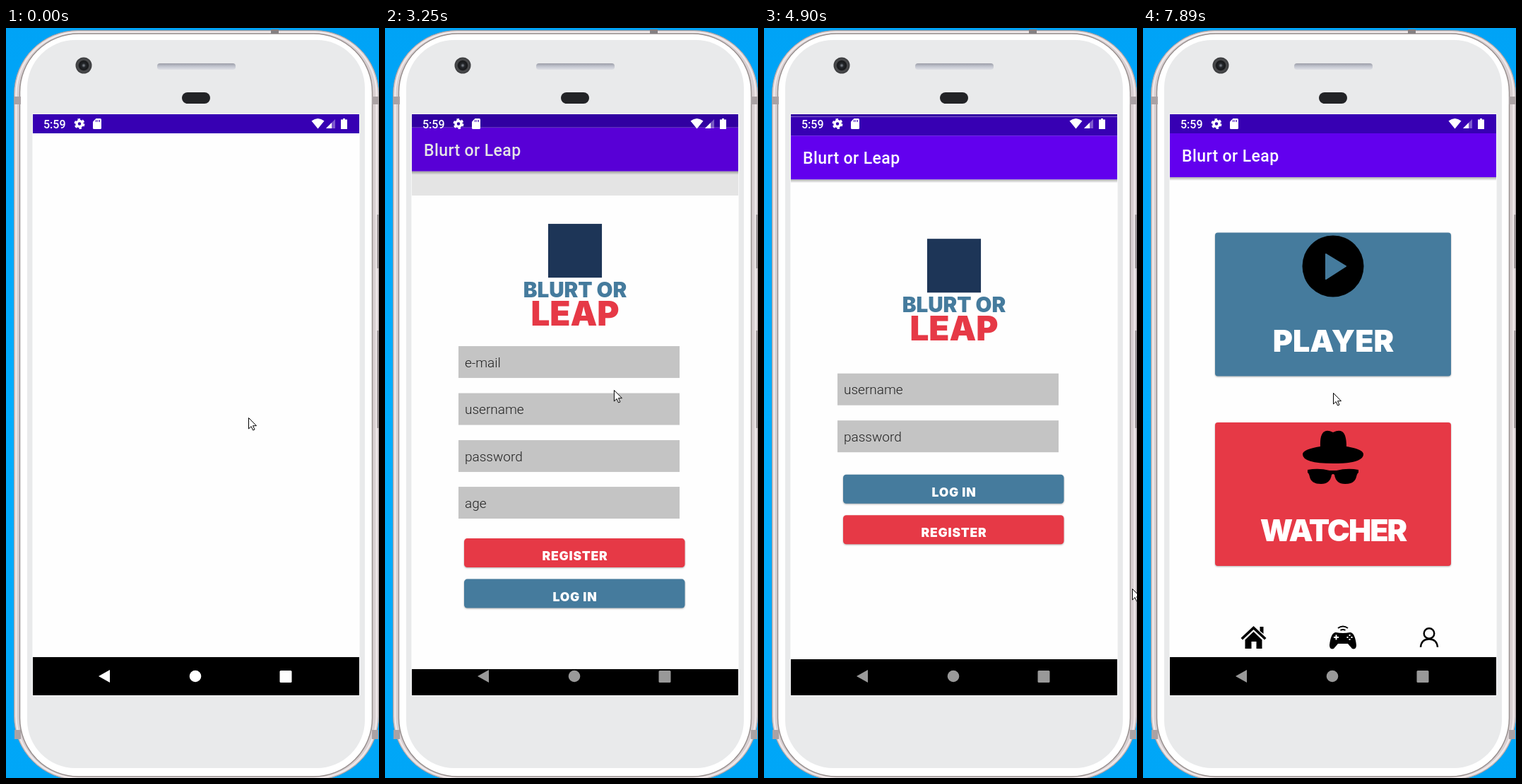
Recreate the animation shown at these times as an HTML page. Size 528x1061 px, loop 8 s.

```html
<!DOCTYPE html>
<html lang="en">
<head>
<meta charset="utf-8">
<title>Phone app walkthrough</title>
<style>
html, body { margin: 0; width: 100%; height: 100%; overflow: hidden; background: #00a9fb; }
svg { position: absolute; left: 0; top: 0; display: block; }
#stage { position: absolute; left: 0; top: 0; width: 528px; height: 1061px; overflow: hidden; }
#screen { position: absolute; left: 38px; top: 122px; width: 462px; height: 822px; overflow: hidden; background: #000; }

/* The script steps the clock of these paused animations. */
.win, .win::after, #nav, #status, #press, #cursor { animation-play-state: paused !important; }
.win {
  position: absolute; left: 0; top: 0; width: 462px; height: 768px; overflow: hidden; background: #fefefe;
  animation: enter .6s linear var(--in) both, leave .4s linear var(--out) both;
}
.win::after {
  content: ""; position: absolute; inset: 0; background: #000; opacity: 0;
  animation: dim .4s linear var(--out) both;
}
@keyframes enter {
  0%, 6% { transform: translateY(34px); clip-path: inset(768px 0 0 0); }
  20% { transform: translateY(24px); clip-path: inset(148px 0 0 0); }
  45% { transform: translateY(3.2px); clip-path: inset(0 0 0 0); }
  68% { transform: translateY(1.4px); clip-path: inset(0 0 0 0); }
  84%, 100% { transform: none; clip-path: inset(0 0 0 0); }
}
@keyframes leave {
  0% { translate: 0 0; }
  30% { translate: 0 -5px; }
  67% { translate: 0 -15px; }
  100% { translate: 0 -16px; }
}
@keyframes dim { 0% { opacity: 0; } 30%, 100% { opacity: .1; } }

#nav { animation: nav 8s linear both; }
@keyframes nav { 0%, 1% { fill: #fff; } 5%, 100% { fill: #999; } }
#status { animation: status 8s step-end both; }
@keyframes status { 0% { opacity: 1; } 8.25% { opacity: 0; } 27.3% { opacity: 1; } }
#press { animation: press 8s step-end both; }
@keyframes press { 0% { opacity: 0; } 57.7% { opacity: .22; } 59.7% { opacity: 0; } }

#cursor { width: 14px; height: 20px; overflow: visible; animation: cursor 8s linear both; }
@keyframes cursor {
  0% { transform: translate(343px, 551px); }
  1.62% { transform: translate(321px, 529px); }
  3.12% { transform: translate(301px, 503px); }
  5%, 30.38% { transform: translate(300px, 501px); }
  32.12% { transform: translate(293px, 609px); }
  33.87% { transform: translate(285px, 520px); }
  35.37% { transform: translate(280px, 450px); }
  37.25%, 39.12% { transform: translate(278px, 444px); }
  43.62% { transform: translate(415px, 647px); }
  48.12% { transform: translate(344px, 722px); }
  49.62%, 57.75% { transform: translate(333px, 711px); }
  59.75% { transform: translate(440px, 758px); }
  61.25% { transform: translate(521px, 793px); }
  63.12% { transform: translate(500px, 778px); }
  69.25%, 70.75% { transform: translate(300px, 650px); }
  72.25% { transform: translate(420px, 722px); }
  73.75%, 75.62% { transform: translate(495px, 768px); }
  81.87% { transform: translate(283px, 675px); }
  83.75% { transform: translate(290px, 796px); }
  85.75% { transform: translate(191px, 854px); }
  87.5% { transform: translate(230px, 857px); }
  89%, 92.12% { transform: translate(260px, 858px); }
  98.62%, 100% { transform: translate(269px, 516px); }
}

.blue { fill: #457b9d; }
.red { fill: #e63946; }
.navy { fill: #1d3557; }
.field { fill: #c4c4c4; }
.card { filter: drop-shadow(0 1.5px 1px rgba(0, 0, 0, .3)); }
.title { font: 500 23px Roboto, sans-serif; letter-spacing: .4px; fill: #fff; }
.clock { font: 500 16px Roboto, sans-serif; fill: #fff; }
.hint { font: 300 19px Roboto, sans-serif; fill: #222; }
.block { font-family: Inter, sans-serif; font-weight: 900; text-anchor: middle; }
.huge { font-size: 55px; letter-spacing: 5px; fill: #fff; }
.large { font-size: 43px; fill: #fff; }
.small { font-size: 17.5px; letter-spacing: .8px; fill: #fff; }
</style>
</head>
<body>
<div id="stage">

<!-- phone body -->
<svg width="528" height="1061" viewBox="0 0 528 1061">
  <defs>
    <linearGradient id="sky" x2="0" y2="1">
      <stop stop-color="#00a3f6"/><stop offset=".5" stop-color="#00adff"/><stop offset="1" stop-color="#00a6f7"/>
    </linearGradient>
    <linearGradient id="slot" x2="0" y2="1">
      <stop stop-color="#9c9ea8"/><stop offset=".5" stop-color="#c3c6d0"/><stop offset="1" stop-color="#dfe1e6"/>
    </linearGradient>
    <linearGradient id="shade" x2="0" y2="1">
      <stop stop-opacity=".32"/><stop offset="1" stop-opacity="0"/>
    </linearGradient>
    <radialGradient id="lens">
      <stop stop-color="#8b9099"/><stop offset=".25" stop-color="#24272b"/><stop offset=".55" stop-color="#17181a"/>
      <stop offset=".7" stop-color="#4c4d4f"/><stop offset="1" stop-color="#3a3b3d"/>
    </radialGradient>

    <g id="bar">
      <rect x="38" y="211" width="462" height="5" fill="url(#shade)"/>
      <rect x="38" y="149" width="462" height="62" fill="#6200ee"/>
      <text class="title" x="55" y="189">Blurt or Leap</text>
    </g>
    <g id="top">
      <use href="#bar"/>
      <rect x="38" y="122" width="462" height="27" fill="#3700b3"/>
    </g>
    <g id="logo">
      <rect class="navy" x="-65.5" width="131" height="131"/>
      <text class="block blue" y="179" font-size="51">BLURT OR</text>
      <text class="block red" y="248" font-size="82">LEAP</text>
    </g>
    <rect id="panel" x="102" width="334" height="203" rx="4"/>
    <rect id="button" x="112" width="312.5" height="41" rx="4.5"/>
    <rect id="input" x="104" width="313" height="45"/>

    <g id="house">
      <path d="M9-15h5v10l-5-4zM-18 1 0-16 18 1l-2.5 2.5L0-11-15.500 3.500z"/>
      <path d="M-12 3.500 0-8 12 3.500V16H4V6h-7v10h-9z"/>
    </g>
    <g id="pad">
      <path d="M-10-7Q0-5 10-7q7 0 9 18 0 7-6 5L7 9H-7l-6 7q-6 2-6-5 2-18 9-18z"/>
      <path d="M-7-13q7-5 14 0M-3.500-10q3.500-2 7 0" fill="none" stroke="#000" stroke-width="2"/>
      <path d="M-13 0h7M-9.500-3.500v7" stroke="#fff" stroke-width="2"/>
      <path d="M9.500-4v2m0 4v2M5.500 0h2m4 0h2" stroke="#fff" stroke-width="2"/>
    </g>
    <g id="person" fill="none" stroke="#000" stroke-width="2.4">
      <circle cy="-5.500" r="7.300"/>
      <path d="M-12 14Q-11 2.500 0 2.500T12 14"/>
    </g>
  </defs>

  <rect width="528" height="1061" fill="url(#sky)"/>
  <rect x="11.500" y="3.500" width="516" height="1060" rx="90" fill="#d9d0d2" stroke="#a79fa1"/>
  <rect x="14.500" y="6" width="510" height="1055" rx="87" fill="none" stroke="#f1ebec" stroke-width="2"/>
  <rect x="19.500" y="8" width="499" height="1051" rx="83" fill="#fff" stroke="#98908f" stroke-width="1.500"/>
  <rect x="22" y="10" width="494" height="1045" rx="80" fill="#fff"/>
  <rect x="30" y="17" width="478" height="1030" rx="68" fill="#e9eaeb"/>
  <path d="M12 97h9v11h-9zm506 0h9v11h-9zM12 993h9v13h-9zm506 0h9v13h-9z" fill="#aaa2a4"/>
  <path d="M375 2h11v6h-11z" fill="#858082"/>
  <path d="M526.500 264v76m0 88v138" stroke="#8c8587" stroke-width="2"/>
  <circle cx="110" cy="53" r="11.500" fill="url(#lens)"/>
  <rect x="214" y="50" width="111" height="9" rx="4" fill="url(#slot)"/>
  <rect x="249" y="91" width="40" height="16" rx="8" fill="#222326"/>
  <rect x="37" y="121" width="464" height="824" fill="#f6f6f7"/>
</svg>

<div id="screen">
  <svg width="462" height="822" viewBox="38 122 462 822">
    <g id="nav">
      <path d="M131 917l16-9v18z"/>
      <circle cx="268" cy="917" r="8.300"/>
      <rect x="387.500" y="909" width="17" height="17" rx="1.500"/>
    </g>
  </svg>

  <!-- launch -->
  <div class="win" style="--in:-1s;--out:.5s">
    <svg width="462" height="768" viewBox="38 122 462 768">
      <rect x="38" y="122" width="462" height="27" fill="#3700b3"/>
    </svg>
  </div>

  <!-- splash -->
  <div class="win" style="--in:.5s;--out:1.93s">
    <svg width="462" height="768" viewBox="38 122 462 768">
      <use href="#bar" y="-27"/>
      <use href="#logo" x="268.500" y="420"/>
    </svg>
  </div>

  <!-- welcome -->
  <div class="win" style="--in:1.93s;--out:3.08s">
    <svg width="462" height="768" viewBox="38 122 462 768">
      <use href="#top"/>
      <use class="card blue" href="#panel" y="313"/>
      <use class="card red" href="#panel" y="559.500"/>
      <text class="block huge" x="273" y="434">SIGN UP</text>
      <text class="block huge" x="272" y="681">LOG IN</text>
    </svg>
  </div>

  <!-- register -->
  <div class="win" style="--in:3.08s;--out:4.63s">
    <svg width="462" height="768" viewBox="38 122 462 768">
      <use href="#top"/>
      <use href="#logo" transform="translate(269 260) scale(.581)"/>
      <use class="field" href="#input" y="433"/>
      <use class="field" href="#input" y="499.500"/>
      <use class="field" href="#input" y="566"/>
      <use class="field" href="#input" y="632"/>
      <text class="hint" x="113" y="462.500">e-mail</text>
      <text class="hint" x="113" y="529">username</text>
      <text class="hint" x="113" y="595.500">password</text>
      <text class="hint" x="113" y="661.500">age</text>
      <use class="card red" href="#button" y="705"/>
      <use class="card blue" href="#button" y="762.500"/>
      <use id="press" href="#button" y="705" fill="#fff"/>
      <text class="block small" x="269" y="736">REGISTER</text>
      <text class="block small" x="269" y="793.500">LOG IN</text>
    </svg>
  </div>

  <!-- log in -->
  <div class="win" style="--in:4.63s;--out:5.78s">
    <svg width="462" height="768" viewBox="38 122 462 768">
      <use href="#top"/>
      <use href="#logo" transform="translate(269 295) scale(.581)"/>
      <use class="field" href="#input" y="485.500"/>
      <use class="field" href="#input" y="552"/>
      <text class="hint" x="113" y="515">username</text>
      <text class="hint" x="113" y="581.500">password</text>
      <use class="card blue" href="#button" y="628.500"/>
      <use class="card red" href="#button" y="686"/>
      <text class="block small" x="269" y="659.500">LOG IN</text>
      <text class="block small" x="269" y="717">REGISTER</text>
    </svg>
  </div>

  <!-- home -->
  <div class="win" style="--in:5.78s;--out:7.37s">
    <svg width="462" height="768" viewBox="38 122 462 768">
      <use href="#top"/>
      <use href="#house" x="142" y="862"/>
      <use href="#pad" x="268" y="862"/>
      <use href="#person" x="385.500" y="863"/>
    </svg>
  </div>

  <!-- role -->
  <div class="win" style="--in:7.37s;--out:9s">
    <svg width="462" height="768" viewBox="38 122 462 768">
      <use href="#top"/>
      <use class="card blue" href="#panel" y="289.500"/>
      <circle cx="269" cy="337" r="43.500"/>
      <path class="blue" d="M259 320l28 17-28 18z" stroke="#457b9d" stroke-width="2" stroke-linejoin="round"/>
      <text class="block large" x="269.500" y="458">PLAYER</text>
      <use class="card red" href="#panel" y="558"/>
      <path d="M251 592q-1-20 8-22 4-1 10 2 8-4 13-1 6 4 6 21 24 4 24 11 0 13-43 13t-43-13q0-7 25-11z"/>
      <path d="M233 625q16-3 31 1h10q15-4 31-1v4q-2 1-3 6-2 10-16 10-13 0-15-13-2-2-4 0-2 13-15 13-14 0-16-10-1-5-3-6z"/>
      <text class="block large" x="269" y="726" letter-spacing="-2">WATCHER</text>
      <use href="#house" x="156.500" y="862"/>
      <use href="#pad" x="283" y="862"/>
      <use href="#person" x="405" y="862"/>
    </svg>
  </div>

  <svg id="status" width="462" height="27" viewBox="38 122 462 27" fill="#fff">
    <text class="clock" x="53" y="141.500">5:59</text>
    <g fill="none" stroke="#fff">
      <circle cx="104" cy="135.500" r="4" stroke-width="3.500"/>
      <circle cx="104" cy="135.500" r="6" stroke-width="3" stroke-dasharray="3.400 2.883"/>
    </g>
    <path d="M127.500 128h6q1.500 0 1.500 1.500v12q0 1.500-1.500 1.500h-9q-1.500 0-1.500-1.500v-9z"/>
    <path d="M127.500 130v3m2.500-3v3m2.500-3v3" stroke="#3700b3"/>
    <path d="M432.500 131.500q9-7 18 0l-9 11z"/>
    <path d="M453 142l13-13v13z" opacity=".35"/>
    <path d="M453 142l8-8v8z"/>
    <path d="M477 128h3v1.500h3V143h-9v-13.500h3z"/>
  </svg>
</div>

<svg id="cursor" viewBox="0 0 14 20">
  <path d="M.5.500v15.500l3.600-3.400 2.500 5.400 2.400-1-2.500-5.300h5z" fill="#fff" stroke="#000"/>
</svg>
</div>

<script>
const bursts = [
  [0, 1], [130, 2], [400, 1], [540, 5], [1950, 5], [2570, 1], [2710, 2], [2980, 1], [3130, 7], [3970, 1],
  [4620, 1], [4780, 2], [5050, 7], [5900, 1], [6050, 1], [6190, 4], [6700, 1], [6860, 1], [7000, 2],
  [7370, 3], [7770, 2]
];
const ticks = bursts.flatMap(([start, n]) => Array.from({ length: n }, (_, i) => start + i * 120));
const anims = document.getAnimations();
const begin = performance.now();
let shown = -1;

function draw() {
  const time = (performance.now() - begin) % 8000;
  const tick = ticks.filter(t => t <= time).pop() ?? 0;
  if (tick !== shown) {
    anims.forEach(a => { a.currentTime = tick; });
    shown = tick;
  }
  requestAnimationFrame(draw);
}
draw();
</script>
</body>
</html>
```
